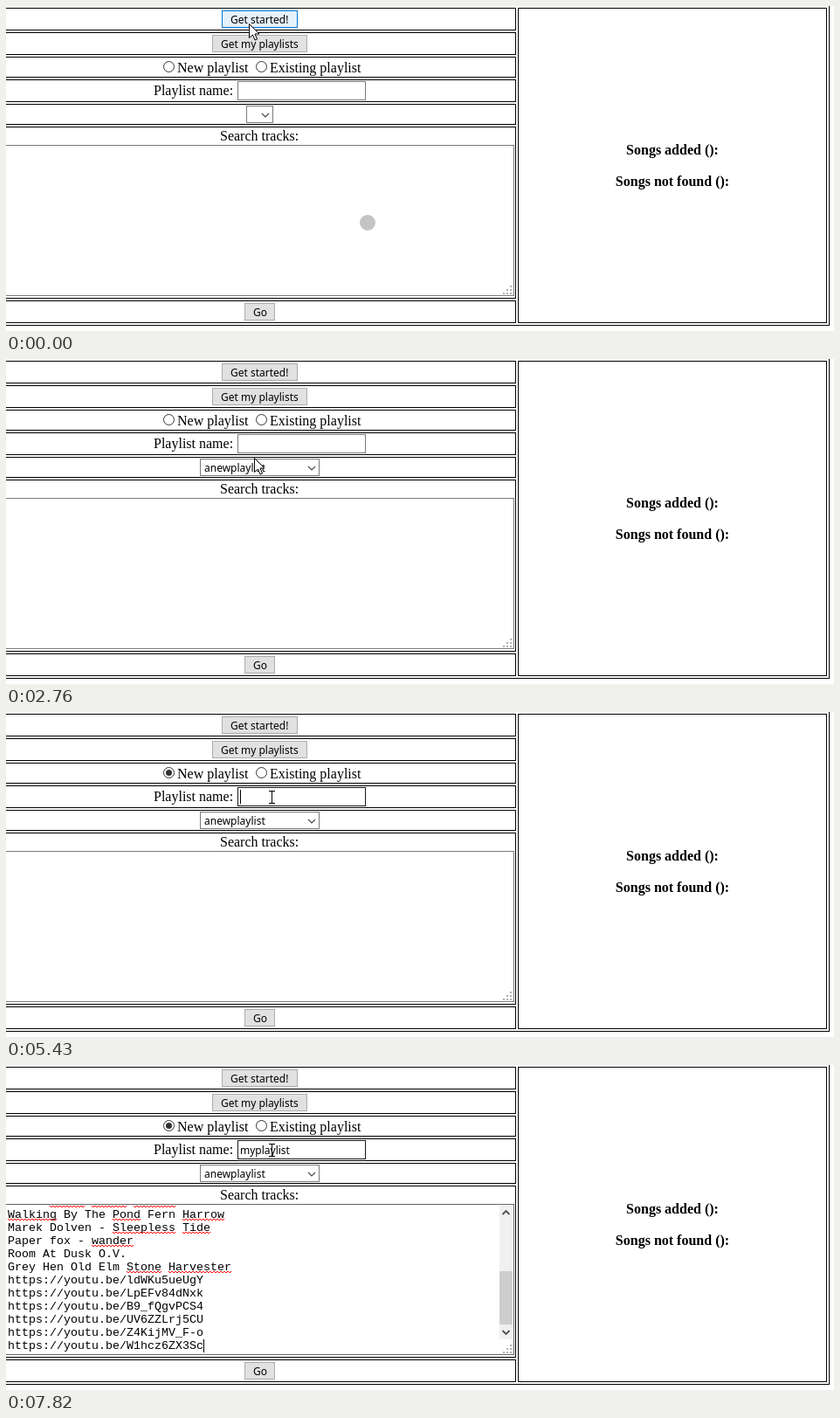
These frames come from a looping animation (948 px wide and 372 px high, 8000 ms). An HTML page with a canvas:

```html
<!DOCTYPE html>
<html lang="en">
<head>
<meta charset="utf-8">
<title>Playlist form</title>
<style>
html, body { margin: 0; width: 100%; height: 100%; overflow: hidden; background: #fff; }
canvas { display: block; width: 948px; height: 372px; }
</style>
</head>
<body>
<canvas id="stage" width="948" height="372"></canvas>
<script>
const LOOP = 8000;
const ctx = document.getElementById('stage').getContext('2d');

const SERIF = '16px "Liberation Serif", serif';
const UI = '12px "Noto Sans", sans-serif';
const MONO = '13.333px "Liberation Mono", monospace';
const BLUE = '#0078d7', GREY = '#7a7a7a', DARK = '#171717';

const inputBox = [265, 86, 147, 22];
const wideSelect = [222, 114, 137, 20];
const smallSelect = [275, 114, 31, 20];

// Each move: start, end, number of jumps, destination.
const moves = [
  [2380, 2760, 6, 284, 113],
  [2840, 2920, 2, 262, 118],
  [2990, 3150, 3, 222, 115],
  [3240, 3700, 7, 187, 74],
  [3850, 3850, 1, 187, 73],
  [4550, 5030, 7, 304, 97]
];

// Pasted lines, each with the words the spell checker marks.
const tracks = [
  ['Walking By The Pond Fern Harrow', 'Walking', 'Pond', 'Harrow'],
  ['Marek Dolven - Sleepless Tide', 'Sleepless', 'Tide'],
  ['Paper fox - wander', 'wander'],
  ['Room At Dusk O.V.'],
  ['Grey Hen Old Elm Stone Harvester', 'Stone', 'Harvester'],
  ['https://youtu.be/ldWKu5ueUgY'],
  ['https://youtu.be/LpEFv84dNxk'],
  ['https://youtu.be/B9_fQgvPCS4'],
  ['https://youtu.be/UV6ZZLrj5CU'],
  ['https://youtu.be/Z4KijMV_F-o'],
  ['https://youtu.be/W1hcz6ZX3Sc']
];

const between = (t, a, b) => t >= a && t < b;
const inside = (p, [x, y, w, h]) => p.x >= x && p.x < x + w && p.y >= y && p.y < y + h;

function rect(x, y, w, h, color) {
  ctx.fillStyle = color;
  ctx.fillRect(x, y, w, h);
}

function box([x, y, w, h], line, fill) {
  if (fill) rect(x, y, w, h, fill);
  ctx.strokeStyle = line;
  ctx.lineWidth = 1;
  ctx.strokeRect(x + 0.5, y + 0.5, w - 1, h - 1);
}

function text(str, x, y, font, color = '#000') {
  ctx.font = font;
  ctx.fillStyle = color;
  ctx.fillText(str, x, y);
}

function path(points, color, width = 1) {
  ctx.beginPath();
  points.forEach(([x, y]) => ctx.lineTo(x, y));
  ctx.strokeStyle = color;
  ctx.lineWidth = width;
  ctx.stroke();
}

function disc(x, y, r, color) {
  ctx.beginPath();
  ctx.arc(x, y, r, 0, Math.PI * 2);
  ctx.fillStyle = color;
  ctx.fill();
}

function chevron(x, y, h, color, width) {
  path([[x - 4, y - h], [x, y + h], [x + 4, y - h]], color, width);
}

function squiggle(x, y, w) {
  const points = [];
  for (let i = 0; i <= w; i += 2) points.push([x + i, y + (i % 4 ? 1 : -1)]);
  path(points, '#f00');
}

function pointerAt(t) {
  let x = 278, y = 20;
  for (const [start, end, steps, toX, toY] of moves) {
    if (t < start) break;
    const done = t >= end ? 1
      : (Math.floor((t - start) / (end - start) * (steps - 1)) + 1) / steps;
    x += (toX - x) * done;
    y += (toY - y) * done;
  }
  return { x: Math.round(x), y: Math.round(y) };
}

function drawTable() {
  rect(0, 0, 948, 372, '#fff');
  const rows = [[2, 27], [30, 55], [58, 81], [84, 109], [112, 135], [138, 334], [337, 362]];
  rows.forEach(([a, b]) => box([-4, a, 588, b - a + 1], '#000'));
  box([586, 2, 354, 361], '#000');
  box([-4, -1, 947, 367], '#000');

  text('Playlist name:', 169, 102, SERIF);
  text('Search tracks:', 245, 154, SERIF);
  ctx.textAlign = 'center';
  text('Songs added ():', 763, 170, 'bold ' + SERIF);
  text('Songs not found ():', 763, 206, 'bold ' + SERIF);
  ctx.textAlign = 'left';
}

function drawButton(label, area, p, live, pressed) {
  const hot = live && inside(p, area);
  const line = pressed ? '#005499' : hot ? BLUE : '#adadad';
  box(area, line, pressed ? '#cce4f7' : hot ? '#e5f1fb' : '#e1e1e1');
  text(label, area[0] + 10, area[1] + 15, UI);
}

function drawRadio(x, label, labelX, p, checked) {
  const hot = inside(p, [x - 7, 63, 14, 14]);
  const color = hot ? BLUE : '#333';
  ctx.beginPath();
  ctx.arc(x, 69.5, 6, 0, Math.PI * 2);
  ctx.strokeStyle = color;
  ctx.lineWidth = 1;
  ctx.stroke();
  if (checked) disc(x, 69.5, 3.5, color);
  text(label, labelX, 76, SERIF);
}

function drawInput(t, p) {
  const focused = between(t, 5190, 6660);
  box(inputBox, focused || inside(p, inputBox) ? DARK : GREY, '#fff');
  const value = t < 5660 ? '' : t < 6040 ? 'm' : t < 6430 ? 'my' : 'myplaylist';
  text(value, 268, 102, UI);
  if (between(t, 5270, 5890) || between(t, 6040, 6660)) {
    rect(268 + Math.round(ctx.measureText(value).width), 89, 1, 16, '#000');
  }
}

function drawSelect(t, p) {
  const area = t < 2000 ? smallSelect : wideSelect;
  const focused = between(t, 6660, 7040);
  const [x, y, w, h] = area;
  box(area, focused ? BLUE : inside(p, area) ? DARK : GREY, '#fff');
  if (t >= 2000) text('anewplaylist', 227, 129, UI);
  if (focused) {
    ctx.setLineDash([1, 1]);
    box([x + 1, y + 1, w - 19, h - 2], '#000');
    ctx.setLineDash([]);
    path([[x + w - 17.5, y], [x + w - 17.5, y + h]], BLUE);
  }
  chevron(x + w - 9, 125, 2, '#444', 1.1);
}

function drawSuggestion(t) {
  if (!between(t, 5740, 6660)) return;
  box([264, 109, 150, 22], '#8a8a8a', '#fff');
  const chosen = t >= 6350;
  if (chosen) rect(266, 111, 145, 17, BLUE);
  text('myplaylist', 269, 124, UI, chosen ? '#fff' : '#000');
}

function drawTracks() {
  ctx.save();
  ctx.beginPath();
  ctx.rect(0, 161, 565, 169);
  ctx.clip();
  [[50, 40], [98, 40], [146, 48]].forEach(([x, w]) => squiggle(x, 162, w));
  tracks.forEach(([line, ...marked], i) => {
    const y = 175 + i * 15;
    text(line, 2, y, MONO);
    marked.forEach(word => squiggle(2 + line.indexOf(word) * 8, y + 2, word.length * 8));
  });
  rect(226, 314, 1, 15, '#000');
  ctx.restore();

  rect(565, 161, 15, 153, '#f0f0f0');
  rect(565, 236, 15, 61, '#cdcdcd');
  chevron(572.5, 169, -2, '#505050', 1.8);
  chevron(572.5, 306, 2, '#505050', 1.8);
}

function drawTextarea(t) {
  box([-1, 159, 583, 173], t >= 7040 ? '#646464' : GREY, '#fff');
  for (let row = 0; row < 3; row++) {
    for (let col = 0; col <= row; col++) {
      rect(577 - col * 4, 320 + row * 4, 2, 2, '#b0b0b0');
    }
  }
  if (between(t, 210, 360) || between(t, 7040, 7590)) rect(2, 162, 1, 15, '#000');
  if (t >= 7820) drawTracks();
}

function drawPointer({ x, y }) {
  ctx.save();
  ctx.translate(x, y);
  if (inside({ x, y }, inputBox)) {
    path([[-3, -6.5], [4, -6.5]], '#000');
    path([[0.5, -6.5], [0.5, 7.5]], '#000');
    path([[-3, 7.5], [4, 7.5]], '#000');
  } else {
    ctx.beginPath();
    [[0, 0], [0, 16], [4, 12.5], [6.5, 18.5], [9, 17.5], [6.5, 11.5], [11.5, 11.5]]
      .forEach(([a, b]) => ctx.lineTo(a + 0.5, b + 0.5));
    ctx.closePath();
    ctx.fillStyle = '#fff';
    ctx.fill();
    ctx.strokeStyle = '#000';
    ctx.lineWidth = 1;
    ctx.stroke();
  }
  ctx.restore();
}

function draw(t) {
  const p = pointerAt(t);
  drawTable();
  drawButton('Get started!', [247, 5, 87, 20], p, !between(t, 2000, 2380), between(t, 360, 520));
  drawButton('Get my playlists', [236, 33, 109, 20], p, true);
  drawButton('Go', [273, 340, 35, 20], p, true);
  drawRadio(186.5, 'New playlist', 196, p, t >= 4250);
  drawRadio(292.5, 'Existing playlist', 302, p, false);
  drawInput(t, p);
  drawSelect(t, p);
  drawTextarea(t);
  if (t < 2000) disc(414, 248, 9, '#c4c4c4');
  drawSuggestion(t);
  drawPointer(p);
}

const began = performance.now();
function tick() {
  draw((performance.now() - began) % LOOP);
  requestAnimationFrame(tick);
}
tick();
</script>
</body>
</html>
```
